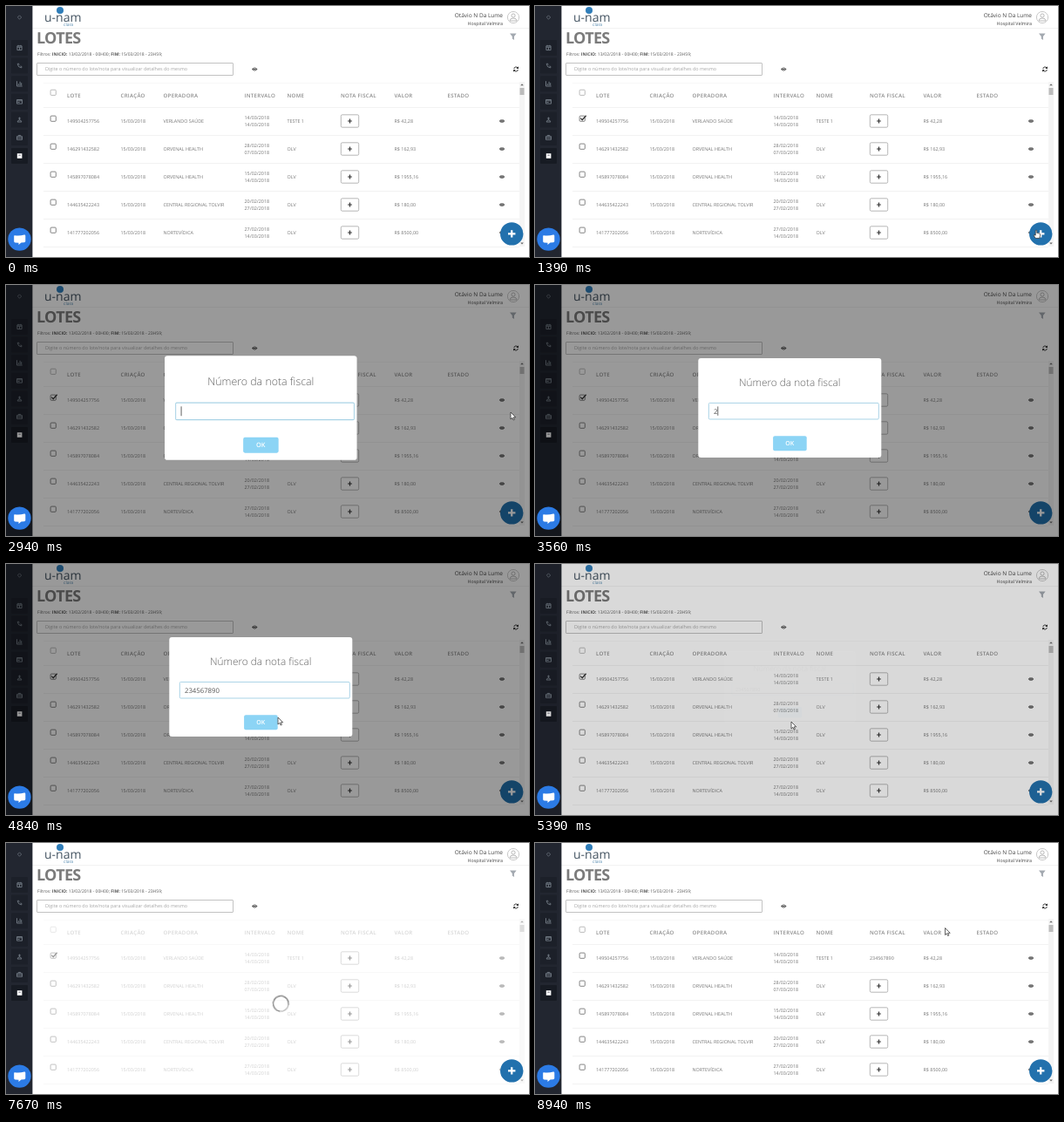
An HTML page that plays this animation: 600 by 288 pixels, repeating every 9 s.

```html
<!DOCTYPE html>
<html lang="pt">
<head>
<meta charset="utf-8">
<title>Lotes</title>
<style>
html,body{margin:0;width:100%;height:100%;overflow:hidden;background:#fff}
svg{display:block;width:600px;height:288px}
text{font-family:"Open Sans","Noto Sans",sans-serif;text-rendering:geometricPrecision;white-space:pre}
</style>
</head>
<body>
<svg id="stage" viewBox="0 0 600 288"></svg>
<script>
const NS = 'http://www.w3.org/2000/svg';
const stage = document.getElementById('stage');

function el(tag, attrs, parent = stage) {
  const e = document.createElementNS(NS, tag);
  for (const k in attrs) e.setAttribute(k, attrs[k]);
  parent.appendChild(e);
  return e;
}
const group = (parent, x = 0, y = 0) => el('g', {transform: `translate(${x} ${y})`}, parent);
const rect = (p, x, y, width, height, fill, more) => el('rect', {x, y, width, height, fill, ...more}, p);
const circle = (p, cx, cy, r, fill, more) => el('circle', {cx, cy, r, fill, ...more}, p);
const fillPath = (p, d, fill) => el('path', {d, fill}, p);
const line = (p, d, stroke, width = 1, more) =>
  el('path', {d, fill: 'none', stroke, 'stroke-width': width, ...more}, p);
function text(p, x, y, str, size, fill = '#757575', more) {
  const e = el('text', {x, y, 'font-size': size, fill, ...more}, p);
  e.textContent = str;
  return e;
}
const show = (e, on) => e.setAttribute('visibility', on ? 'visible' : 'hidden');
const fade = (e, v) => e.setAttribute('opacity', v);

function eye(p, x, y) {
  const g = group(p, x, y);
  fillPath(g, 'M-3.2 0Q0-4 3.2 0Q0 4-3.2 0Z', '#444');
  circle(g, 0, 0, 1.4, '#fff');
  circle(g, 0, 0, .9, '#333');
}
const box = (p, y, color) =>
  rect(p, 51.1, y - 3.1, 6.2, 6.2, '#fff', {rx: 1, stroke: color, 'stroke-width': .8});

// page
rect(stage, 0, 0, 600, 288, '#fff');
const page = group(stage);
rect(page, 30, 25, 570, .7, '#ececec');
circle(page, 62, 5, 4, '#2f7db8');
text(page, 44, 18, 'u-nam', 14, '#465563');
text(page, 66, 22.8, 'clara', 5, '#4f86ad');
text(page, 570, 13, 'Otávio N Da Lume', 6.5, '#444', {'text-anchor': 'end'});
text(page, 570, 21.8, 'Hospital Velmira', 5.3, '#444', {'text-anchor': 'end'});
circle(page, 582, 13, 6.6, '#fff', {stroke: '#bbb', 'stroke-width': .8});
circle(page, 582, 11, 2.1, 'none', {stroke: '#aaa', 'stroke-width': .8});
line(page, 'M578 17Q578 14 582 14T586 17Z', '#aaa', .8);

text(page, 35, 43.4, 'LOTES', 18, '#7b7b7b', {'font-weight': 700, 'letter-spacing': -.7});
fillPath(page, 'M578 31.5H585.6L582.9 35V39L580.8 37.5V35Z', '#a3a9b0');
const info = text(page, 36, 56.6, '', 5, '#555');
[['Filtros: '], ['INICIO: ', 1], ['13/02/2018 - 00H00; '], ['FIM: ', 1], ['15/03/2018 - 23H59;']].forEach(([s, bold]) => {
  el('tspan', {'font-weight': bold ? 700 : 400}, info).textContent = s;
});
rect(page, 35.5, 65.5, 225, 14, '#fff', {rx: .5, stroke: '#c2c2c2', 'stroke-width': 1});
text(page, 45, 74.2, 'Digite o número do lote/nota para visualizar detalhes do mesmo', 5.45, '#a5a5a5');
eye(page, 285.3, 72.5);
line(page, 'M582.8 72A2.3 2.3 0 0 1 587 71M587.3 73A2.3 2.3 0 0 1 583.1 74', '#333', 1);
fillPath(page, 'M588 69.3V72H585.4ZM582.1 75.7V73H584.7Z', '#333');

// sidebar
rect(page, 0, 0, 30.4, 288, '#222630');
line(page, 'M15.5 10.8L17.7 13 15.5 15.2 13.3 13Z', '#626a74', .9);
[
  'M-2.6-2.2H2.6V2.6H-2.6ZM-2.6-.8H2.6M-1.4-3.2V-1.6M1.4-3.2V-1.6M0-.8V2.6',
  'M-2.3-2.3Q-2 2 2.3 2.3L2.4.8 1 .4M-2.3-2.3L-.8-2.4-.4-1',
  'M-3-3V2.8H3.2M-1.2 2V0M.6 2V-2.4M2.2 2V-1',
  'M-3-2.3H3V2.3H-3ZM-3-1H3M-2 .7H0',
  'M0-2.8V.5M-1.3-1.5H1.3M-2.4 2.6Q-2 .5 0 .5T2.4 2.6Z',
  'M-3-1.4H3V2.4H-3ZM-1.2-1.4V-2.6H1.2V-1.4M-3 .4H3'
].forEach((d, i) => {
  const y = 48 + i * 20.6;
  rect(page, 6, y - 9, 19, 18, '#1c2029', {rx: 1});
  line(group(page, 15.5, y), d, '#6c747e', 1);
});
rect(page, 6, 163, 19, 18, '#171b23', {rx: 1});
rect(page, 12.8, 169.2, 5.6, 5.6, '#fff');
rect(page, 14.3, 170.8, 2.6, .7, '#445');

// table
const grid = group(page), words = group(page), tools = group(page);
for (let y = 116; y < 280; y += 32) rect(grid, 43, y, 546, .6, '#e9e9e9');
rect(grid, 43, 88, 546, .5, '#f0f0f0');
rect(grid, 589, 87, 6, 189, '#f5f5f5');
rect(grid, 589.5, 94, 5, 8, '#bcbcbc');
fillPath(grid, 'M590.2 91.3H593.8L592 89.2ZM590.2 271.5H593.8L592 273.6Z', '#666');
box(words, 99.3, '#aaa');
[[70, 'LOTE'], [131.5, 'CRIAÇÃO'], [180.5, 'OPERADORA'], [273.5, 'INTERVALO'], [322.5, 'NOME'],
 [384, 'NOTA FISCAL'], [445.5, 'VALOR'], [506.5, 'ESTADO']].forEach(([x, s]) =>
  text(words, x, 104.8, s, 6.1, '#8c8c8c', {'font-weight': 600, 'letter-spacing': .3}));

const rows = [
  ['149504257756', 'VERLANDO SAÚDE', '14/03/2018', '14/03/2018', 'TESTE 1', '42,28'],
  ['146291432582', 'ORVENAL HEALTH', '28/02/2018', '07/03/2018', 'OLV', '162,93'],
  ['145897078084', 'ORVENAL HEALTH', '15/02/2018', '14/03/2018', 'OLV', '1955,16'],
  ['144635422243', 'CENTRAL REGIONAL TOLVIR', '20/02/2018', '27/02/2018', 'OLV', '180,00'],
  ['141777202056', 'NORTEVÍDICA', '27/02/2018', '14/03/2018', 'OLV', '8500,00']
];
let firstAdd;
rows.forEach(([id, firm, from, to, name, value], i) => {
  const y = 132 + i * 32;
  const put = (x, dy, s) => text(words, x, y + dy, s, 5.4);
  put(70, 2, id);
  put(131.5, 2, '15/03/2018');
  put(180.5, 2, firm);
  put(273.5, -2, from);
  put(273.5, 6, to);
  put(322.5, 2, name);
  put(445.5, 2, 'R$ ' + value);
  box(tools, y - 2.8, '#666');
  const add = group(tools, 394.5, y);
  rect(add, -10.2, -7.2, 20.4, 14.4, '#fff', {rx: 1.5, stroke: '#a5a5a5', 'stroke-width': .8});
  line(add, 'M-2.4 0H2.4M0-2.4V2.4', '#333', 1.2);
  if (!i) firstAdd = add;
  eye(tools, 569, y);
});
const tick = line(tools, 'M52.3 128.6L54.2 130.8 58.6 125.8', '#333', 1.3);
const note = text(words, 384, 134, '234567890', 5.4);

const spinner = group(stage);
circle(spinner, 0, 0, 8.8, 'none', {stroke: '#b4b4b4', 'stroke-width': 1.3});
line(spinner, 'M0-8.8A8.8 8.8 0 1 1-8.8 0', '#8a8a8a', 1.3);

// speed dial
const dial = [
  ['LOTE PAGO PELA OPERADORA', 478.5], ['LOTE ENVIADO PARA OPERADORA', 467.5], ['NOTA FISCAL', 525.5],
  ['NOMEAR LOTES', 518.5], ['DOWNLOAD LOTES', 510], ['NOVO LOTE', 530.5], ['LIMPAR SELECIONADOS', 496.5]
].map(([s, left], i) => {
  const y = 103 + i * 22;
  const label = group(stage);
  rect(label, left, y - 6, 567 - left, 12, '#787878', {rx: 1});
  text(label, (left + 567) / 2, y + 2, s, 5.4, '#fff', {'text-anchor': 'middle', 'font-weight': 700});
  const knob = group(stage);
  circle(knob, 0, 0, 9, '#ef4b43');
  return {label, knob, y};
});
const knob = i => dial[i].knob;
text(knob(0), 0, 4.8, '$', 13.5, '#fff', {'text-anchor': 'middle', 'font-weight': 600});
fillPath(knob(1), 'M5-5L3 4.5-.2 3-2 5V2L3-3-3 1.5-5.4.5Z', '#fff');
for (const [x, w] of [[-5, 1.4], [-2.9, .7], [-1.5, 1.3], [.5, .7], [1.9, 1.3], [4, 1]])
  rect(knob(2), x, -4, w, 8, '#fff');
line(knob(3), 'M-5.2-3.2H5.2V3.2H-5.2ZM-2.7 1.7H2.7', '#fff', 1);
line(knob(3), 'M-4-1.3H4M-4 .3H4', '#fff', .9, {'stroke-dasharray': '1 .75'});
fillPath(knob(4), 'M-1.4-5H1.4V-1.6H3.8L0 2-3.8-1.6H-1.4ZM-5 1.5H-2.3L0 3.5 2.3 1.5H5V5H-5Z', '#fff');
line(knob(5), 'M-4.5 0H4.5M0-4.5V4.5', '#fff', 2.6);
rect(knob(6), -4, -4, 8, 8, 'none', {rx: 1, stroke: '#fff', 'stroke-width': 1.3});

circle(stage, 580.2, 261.4, 13.2, '#2271ad');
const plus = line(group(stage, 580.2, 261.4), 'M-4.2 0H4.2M0-4.2V4.2', '#fff', 2.3);

// dialog
const shade = rect(stage, 0, 0, 600, 288, '#000');
const modal = group(stage);
rect(modal, -105, -57, 210, 114, '#fff', {rx: 3});
text(modal, 0, -25, 'Número da nota fiscal', 11.8, '#606060', {'text-anchor': 'middle', 'font-weight': 300});
rect(modal, -93, -5.6, 195, 18.6, '#fff', {rx: 1.2, stroke: '#a9d3e6', 'stroke-width': 1});
const typed = text(modal, -87.3, 7, '', 7.75, '#555');
const caret = rect(modal, -87.3, -1.6, .8, 10.4, '#444');
rect(modal, -19.2, 32.2, 38.6, 17, '#8cd4f5', {rx: 2});
text(modal, 0, 43.2, 'OK', 7, '#fff', {'text-anchor': 'middle', 'font-weight': 600});

// chat button
circle(stage, 15.5, 267.6, 13.2, '#2c7be5');
fillPath(stage, 'M10 263.2Q15.5 264 21 262.6Q22.3 262.4 22.3 263.7V270Q22.3 271 21 271.2L17.5 271.6 14.5 274V271.8L10.5 271.4Q9.2 271.2 9.2 270V264Q9.2 263.1 10 263.2Z', '#fff');

// pointers
const arrow = el('path', {d: 'M0 0V8L1.9 6.3 3.1 9 4.4 8.4 3.2 5.8H5.7Z', fill: '#fff', stroke: '#222', 'stroke-width': .7});
const hand = el('path', {
  d: 'M-.8.6Q0-.5.8.6V3.4L4 4.1Q4.8 4.4 4.6 6L3.8 9.4H-.8L-3 6Q-2.8 4.8-.8 6.2Z',
  fill: '#fff', stroke: '#222', 'stroke-width': .7
});

const LOOP = 9000, SAVED = 7950;
const track = [
  [60, 150, 112], [310, 53, 128], [970, 53, 128], [1390, 575, 257], [1780, 575, 257],
  [2080, 580, 191.5], [2500, 579, 146], [4660, 579, 146], [4840, 312, 176], [4960, 294, 181],
  [5400, 294, 181], [8880, 472, 98], [8940, 470.5, 97.5]
];
const pop = [[0, .7], [135, 1.05], [240, .95], [300, 1]];
const ramp = (t, a, b) => Math.min(1, Math.max(0, (t - a) / (b - a)));
const ease = p => p * p * (3 - 2 * p);
const within = (t, ...spans) => spans.some(([a, b]) => t >= a && t < b);

// eased values between the steps of a table [time, ...values]
function sample(table, t) {
  let i = 0;
  while (i < table.length - 2 && t >= table[i + 1][0]) i++;
  const a = table[i], b = table[i + 1], p = ease(ramp(t, a[0], b[0]));
  return a.slice(1).map((v, k) => v + (b[k + 1] - v) * p);
}

function draw(t) {
  const saved = t >= SAVED;
  show(tick, t >= 310 && !saved);
  show(firstAdd, !saved);
  show(note, saved);

  const wash = ramp(t, 5510, 5690) * (1 - ramp(t, SAVED, 8220));
  fade(words, 1 - .66 * wash);
  fade(tools, 1 - .5 * wash);
  fade(grid, 1 - .5 * wash);
  fade(spinner, wash);
  spinner.setAttribute('transform', `translate(315.3 184.3) rotate(${t * .4 % 360})`);

  const open = ramp(t, 1780, 1960) * (1 - ramp(t, 2750, 2860));
  plus.setAttribute('transform', `rotate(${45 * ease(open)})`);
  dial.forEach((d, i) => {
    const start = 1780 + (6 - i) * 20;
    const s = ease(ramp(t, start, start + 150)) * (1 - ramp(t, 2750, 2870));
    d.knob.setAttribute('transform', `translate(580.4 ${d.y}) scale(${s})`);
    show(d.knob, s > 0);
    fade(d.label, s);
  });

  const gone = ramp(t, 5210, 5400);
  fade(shade, .4 * ramp(t, 2750, 2920) * (1 - ramp(t, 5210, 5500)));
  fade(modal, ramp(t, 2805, 2890) * (1 - gone));
  show(modal, t >= 2805 && gone < 1);
  const size = sample(pop, t - 2805)[0] * (1 - .3 * gone);
  modal.setAttribute('transform', `translate(292.3 141) scale(${size})`);
  const count = t < 3560 ? 0 : Math.min(9, 1 + Math.ceil(8 * Math.max(0, Math.floor((t - 3900) / 60)) / 6));
  typed.textContent = '234567890'.slice(0, count);
  caret.setAttribute('x', -87.3 + count * 4.43);
  fade(caret, t >= 2805 && t < 4660 ? 1 : 0);

  const [x, y] = sample(track, t);
  const seen = within(t, [60, 3560], [4660, 5450], [8880, LOOP]);
  const press = within(t, [1330, 2750], [4900, 5210]);
  for (const p of [arrow, hand]) p.setAttribute('transform', `translate(${x} ${y})`);
  show(arrow, seen && !press);
  show(hand, seen && press);
}

const begin = performance.now();
function tickFrame() {
  draw((performance.now() - begin) % LOOP);
  requestAnimationFrame(tickFrame);
}
tickFrame();
</script>
</body>
</html>
```
